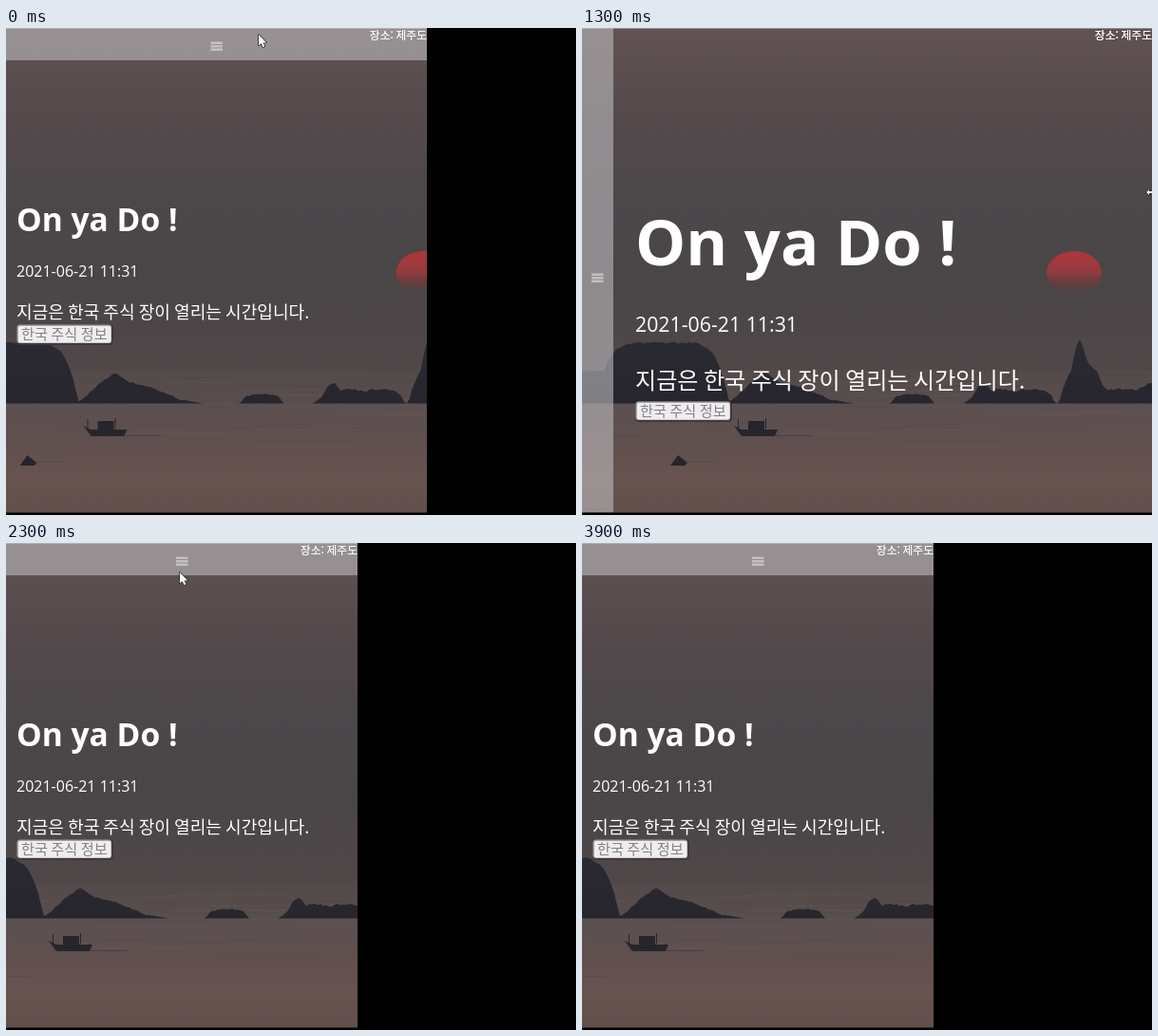
An HTML page with a canvas that plays this animation: 600 px wide and 513 px high, repeating every 4200 ms.

```html
<!DOCTYPE html>
<html lang="ko">
<head>
<meta charset="utf-8">
<style>
  html, body { margin: 0; width: 100%; height: 100%; overflow: hidden; background: #000; }
  canvas { display: block; }
</style>
</head>
<body>
<canvas id="stage" width="600" height="513"></canvas>
<script>
const ctx = document.getElementById('stage').getContext('2d');
const LOOP = 4200, STEP = 100, FLOOR = 510.5, BREAKPOINT = 535, NAV = 34;
const START = 443, WIDE = 600, NARROW = 370;
const LATIN = '"Open Sans", "Noto Sans", sans-serif';
const HANGUL = '"Noto Sans CJK KR", "Noto Sans CJK", "Noto Sans CJK JP", sans-serif';

const mix = (a, b, k) => a + (b - a) * k;
const random = seed => Math.abs(Math.sin(seed * 12.9898) * 43758.5453) % 1;

// Eased progress from 0 to 1; a higher power stays longer near both ends.
function progress(t, from, to, power = 2) {
  const u = Math.min(1, Math.max(0, (t - from) / (to - from)));
  return u < .5 ? (2 * u) ** power / 2 : 1 - (2 - 2 * u) ** power / 2;
}

function glide(t, from, to, a, b) {
  const k = progress(t, from, to);
  return [mix(a[0], b[0], k), mix(a[1], b[1], k)];
}

function windowWidth(t) {
  const grown = mix(START, WIDE, progress(t, 600, 1200, 3.5));
  return mix(grown, NARROW, progress(t, 1400, 1960));
}

function rect(x, y, w, h, fill) {
  ctx.fillStyle = fill;
  ctx.fillRect(x, y, w, h);
}

function roundRect(x, y, w, h, r, fill) {
  ctx.beginPath();
  ctx.roundRect(x, y, w, h, r);
  ctx.fillStyle = fill;
  ctx.fill();
}

function text(str, x, y, font, fill = '#fff', align = 'left') {
  ctx.font = font;
  ctx.fillStyle = fill;
  ctx.textAlign = align;
  ctx.fillText(str, x, y);
}

function gradient(y0, y1, ...colors) {
  const g = ctx.createLinearGradient(0, y0, 0, y1);
  colors.forEach((c, i) => g.addColorStop(i / (colors.length - 1), c));
  return g;
}

// Each hump: centre, half width, height, squareness.
const HUMPS = [
  [85, 70, 64, 6], [10, 60, 35, 2],
  [193, 38, 31, 1.3], [210, 60, 22, 1.3], [240, 45, 5, 2],
  [348, 23, 10, 4],
  [423, 16, 22, 1.5], [440, 38, 15, 2], [474, 24, 15, 4],
  [524, 14, 67, 1.6], [528, 26, 42, 2.5], [552, 50, 15, 6], [605, 40, 23, 1.5]
];

function rockHeight(x) {
  const height = Math.max(0, ...HUMPS.map(([cx, half, h, p]) => h * (1 - Math.abs((x - cx) / half) ** p)));
  return height && height + Math.min(1, height / 8) * (random(x) - .5) * 2;
}

function rockLine() {
  const path = new Path2D();
  path.moveTo(-10, 395.5);
  for (let x = -10; x <= 610; x += 3) path.lineTo(x, 395.5 - rockHeight(x));
  path.lineTo(610, 395.5);
  return path;
}

const ROCKS = rockLine();
const BOAT = new Path2D('M160 419L168 423H175V414H192V423H206L203 430H168ZM164 412H165V422H164ZM193 411H194V422H193Z');
const SKIFF = new Path2D('M93 461L101 450 111 458 108 461Z');
const POINTER = new Path2D('M0 0V11.5L2.6 9.2 4.5 13.2 6.4 12.3 4.6 8.4H8.2Z');
const HAND = new Path2D('M-1 1Q0-1 1.5 1L3 7Q10.5 5 10.5 10V14L8.5 18H2L-2.5 12Q-4 9-1.5 9L.5 11Z');
const RESIZE = new Path2D('M-5 0L-2-3V-1H2V-3L5 0 2 3V1H-2V3Z');

// Scene coordinates match the widest window; the picture stays centred.
function scene(w) {
  ctx.save();
  ctx.translate((w - WIDE) / 2, 0);
  rect(-10, 0, 620, 362, gradient(0, 362, '#625253', '#554a4c', '#4c474a', '#4a4547', '#504748'));
  rect(-10, 360, 620, 36, gradient(360, 396, '#544a4a', '#594e4e'));
  rect(-10, 395, 620, 116, gradient(395, 511, '#5c5050', '#604f4f', '#67534f', '#624f4c'));
  for (let i = 0; i < 40; i++) {
    const shade = i % 2 ? 'rgba(150,125,120,.09)' : 'rgba(40,38,45,.1)';
    rect(random(i + .1) * 560, 362 + random(i + .2) * 75, 30 + random(i + .3) * 120, 1, shade);
  }

  ctx.beginPath();
  ctx.ellipse(518, 258, 29, 23, 0, 0, 7);
  ctx.fillStyle = gradient(235, 281, '#a9383d', '#a2383d', '#8f3b40', 'rgba(115,55,58,.65)', 'rgba(80,65,67,0)');
  ctx.fill();

  ctx.fillStyle = gradient(328, 395, '#2a2a32', '#27262e');
  ctx.fill(ROCKS);
  ctx.fillStyle = '#26252c';
  ctx.fill(BOAT);
  ctx.fill(SKIFF);
  rect(204, 429, 38, 1, 'rgba(45,42,48,.45)');
  rect(110, 456, 31, 1.5, 'rgba(75,75,85,.6)');
  ctx.restore();
}

function button(x, y) {
  roundRect(x, y, 102, 22, 4, '#3f3a3f');
  roundRect(x + .5, y + .5, 99.5, 19.5, 3, '#aaa5aa');
  roundRect(x + 2, y + 2, 97.5, 17.5, 2, '#efedf0');
  text('한국 주식 정보', x + 5, y + 16, '15.2px ' + HANGUL, '#858287');
}

function content(wide) {
  const x = wide ? 56 : 11;
  const [title, date, line] = wide ? [67, 21.3, 24.1] : [33.6, 16, 18.1];
  const [titleY, dateY, lineY, buttonY] = wide ? [250, 320, 380, 393] : [214, 262, 306, 312];
  text('On ya Do !', x, titleY, `bold ${title}px ${LATIN}`);
  text('2021-06-21 11:31', x, dateY, `${date}px ${LATIN}`);
  text('지금은 한국 주식 장이 열리는 시간입니다.', x, lineY, `${line}px ${HANGUL}`);
  button(x, buttonY);
}

// The bar itself unfolds into the full menu and turns opaque.
function navigation(w, wide, open) {
  const height = wide ? FLOOR : mix(NAV, FLOOR, open);
  ctx.save();
  ctx.beginPath();
  ctx.rect(0, 0, wide ? NAV - 1 : w, height);
  ctx.clip();
  ctx.globalAlpha = mix(.6, 1, open);
  rect(0, 0, w, height, '#bdbbbe');

  ctx.globalAlpha = 1 - open;
  const [x, y] = wide ? [16, 263] : [w / 2, 19];
  for (let i = 0; i < 3; i++) rect(x - 6, y - 4.5 + i * 3.5, 12.5, 2.5, 'rgba(230,226,226,.6)');

  ctx.globalAlpha = open;
  text('×', 207, 105, '9px ' + LATIN, '#77757a', 'center');
  ['Home', 'About', 'Korea Stock', 'USD Stock', 'FogMint'].forEach((label, i) =>
    text(label, 207, 172.3 + i * 67.8, '600 6.5px ' + LATIN, '#fff', 'center'));
  ctx.restore();
}

function page(w, open) {
  const wide = w > BREAKPOINT;
  scene(w);
  content(wide);
  if (open < 1) text('장소: 제주도', w, 12, '11.8px ' + HANGUL, '#fff', 'right');
  navigation(w, wide, open);
  if (open < .5) text('장소: 제주도', w, 12, '11.8px ' + HANGUL, '#fff', 'right');
  rect(0, 0, w, 1, 'rgba(205,205,215,.45)');
}

function drawCursor(shape, [x, y]) {
  ctx.save();
  ctx.translate(x, y);
  ctx.lineWidth = 1.4;
  ctx.lineJoin = 'round';
  ctx.strokeStyle = '#222';
  ctx.stroke(shape);
  ctx.fillStyle = '#fff';
  ctx.fill(shape);
  ctx.restore();
}

function cursor(t, w) {
  const rest = [183, 31], icon = [184, 19], close = [207, 100];
  if (t < 600) drawCursor(POINTER, glide(t, 0, 600, [266, 7], [440, 170]));
  else if (t < 2100) drawCursor(RESIZE, [w - 1, mix(173, 190, progress(t, 1400, 1700))]);
  else if (t < 2400) drawCursor(POINTER, glide(t, 2000, 2300, [368, 190], rest));
  else if (t < 2800) drawCursor(HAND, glide(t, 2300, 2600, rest, icon));
  else if (t < 3800) drawCursor(t < 3200 ? POINTER : HAND, glide(t, 2700, 3400, icon, close));
}

function draw(t) {
  const w = windowWidth(t);
  // The page layout trails the window edge while shrinking.
  const layout = Math.max(w, windowWidth(t - 40));
  const open = progress(t, 2600, 3000) - progress(t, 3600, 3900);
  rect(0, 0, 600, 513, '#000');
  ctx.save();
  ctx.beginPath();
  ctx.rect(0, 0, w, FLOOR);
  ctx.clip();
  page(layout, open);
  cursor(t, w);
  ctx.restore();
}

const start = performance.now();
function tick() {
  const t = (performance.now() - start) % LOOP;
  draw(Math.floor(t / STEP) * STEP);
  requestAnimationFrame(tick);
}
tick();
</script>
</body>
</html>
```
